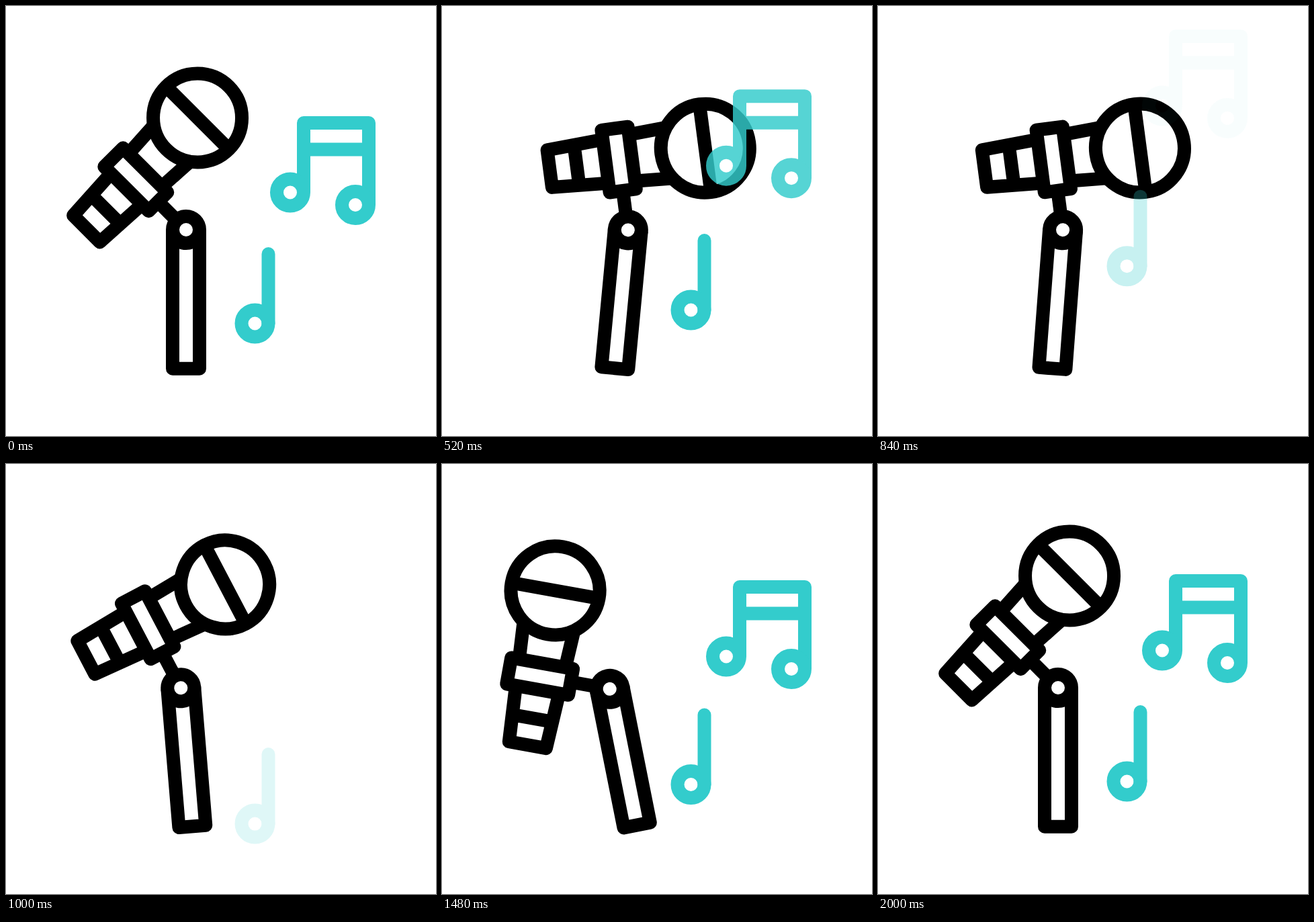
Animation, 640 px wide and 640 px high, one loop 2.44 s. Source, as an HTML page:

```html
<!DOCTYPE html>
<html lang="en">
<head>
<meta charset="utf-8">
<title>Microphone and notes</title>
<style>
  html, body { margin: 0; width: 100%; height: 100%; overflow: hidden; background: #fff; }
  svg { display: block; width: 100%; height: 100%; }
  g { fill: none; stroke-width: 20; stroke-linejoin: round; }
  .ink { stroke: #000; }
  .note { stroke: #33cccc; }
  .solid { fill: #fff; }
</style>
</head>
<body>
<svg viewBox="0 0 640 640">
  <!-- local y runs from the head to the tail -->
  <g id="mic" class="ink">
    <path d="M-38 55L-28 233.5H28L38 55M-30 193H30"/>
    <path d="M0 129.8H86"/>
    <rect class="solid" x="-46.7" y="110" width="93.4" height="39.5"/>
    <circle class="solid" r="66"/>
    <path d="M-66 0H66"/>
  </g>
  <g id="stand" class="ink">
    <path class="solid" d="M248 333V539.7H288V333"/>
    <circle class="solid" cx="268" cy="333" r="20"/>
  </g>
  <g id="pair" class="note">
    <path d="M443 277.5V174H540V296M443 213.5H540"/>
    <circle cx="423" cy="277.5" r="20"/>
    <circle cx="520" cy="296" r="20"/>
  </g>
  <g id="single" class="note">
    <path stroke-linecap="round" d="M390.5 369V472.5"/>
    <circle cx="370.5" cy="472.5" r="20"/>
  </g>
</svg>
<script>
const LOOP = 2440, STEP = 40, SWITCH = 955;
const $ = id => document.getElementById(id);
const clamp = v => Math.min(1, Math.max(0, v));

// Cubic bezier easing with handles (x1, 0) and (x2, 1)
function ease(x, x1, x2) {
  let lo = 0, hi = 1, s = 0.5;
  for (let i = 0; i < 30; i++) {
    s = (lo + hi) / 2;
    const bx = 3 * s * (1 - s) * (x1 * (1 - s) + x2 * s) + s * s * s;
    if (bx < x) lo = s; else hi = s;
  }
  return s * s * (3 - 2 * s);
}

// Swings: start, end, target angle, easing handles
const micSwings = [
  [80, 600, 38.2, 0.3, 0.3],
  [790, 1310, -36.4, 0.6, 0.4],
  [1400, 2000, 0, 0.4, 0.4]
];
const standSwings = [
  [80, 720, 7.05, 1 / 3, 2 / 3],
  [728, 1208, -12.6, 1 / 3, 2 / 3],
  [1390, 1840, 0, 1 / 3, 2 / 3]
];

function angleAt(swings, t) {
  let angle = 0;
  for (const [start, end, target, x1, x2] of swings) {
    if (t <= start) break;
    if (t >= end) angle = target;
    else angle += (target - angle) * ease((t - start) / (end - start), x1, x2);
  }
  return angle;
}

// Notes speed up as they leave, then settle from below
const notes = [
  { el: $("pair"), leave: 120, rise: 2.49e-4, fadeOut: 451, settle: 1720, drop: 1.56e-4, fadeIn: 1040 },
  { el: $("single"), leave: 220, rise: 2.22e-4, fadeOut: 548, settle: 1655, drop: 1.47e-4, fadeIn: 958 }
];

function drawNote(n, t) {
  const leaving = t < SWITCH;
  const y = leaving
    ? -n.rise * Math.max(0, t - n.leave) ** 2
    : n.drop * Math.max(0, n.settle - t) ** 2;
  const alpha = leaving ? 1 - clamp((t - n.fadeOut) / 400) : clamp((t - n.fadeIn) / 280);
  n.el.setAttribute("transform", `translate(0 ${y})`);
  n.el.setAttribute("opacity", alpha);
}

function draw(time) {
  let t = Math.floor((time % LOOP) / STEP) * STEP;
  if (t < 120) t = 0;
  const lean = angleAt(standSwings, t);
  const rad = lean * Math.PI / 180;
  const px = 268 + 93.5 * Math.sin(rad);
  const py = 426.5 - 93.5 * Math.cos(rad);
  $("stand").setAttribute("transform", `rotate(${lean} 268 426.5)`);
  $("mic").setAttribute("transform",
    `translate(${px} ${py}) rotate(${45 + angleAt(micSwings, t)}) translate(-105.7 -129.8)`);
  for (const n of notes) drawNote(n, t);
}

const begin = performance.now();
function tick() {
  draw(performance.now() - begin);
  requestAnimationFrame(tick);
}
tick();
</script>
</body>
</html>
```
